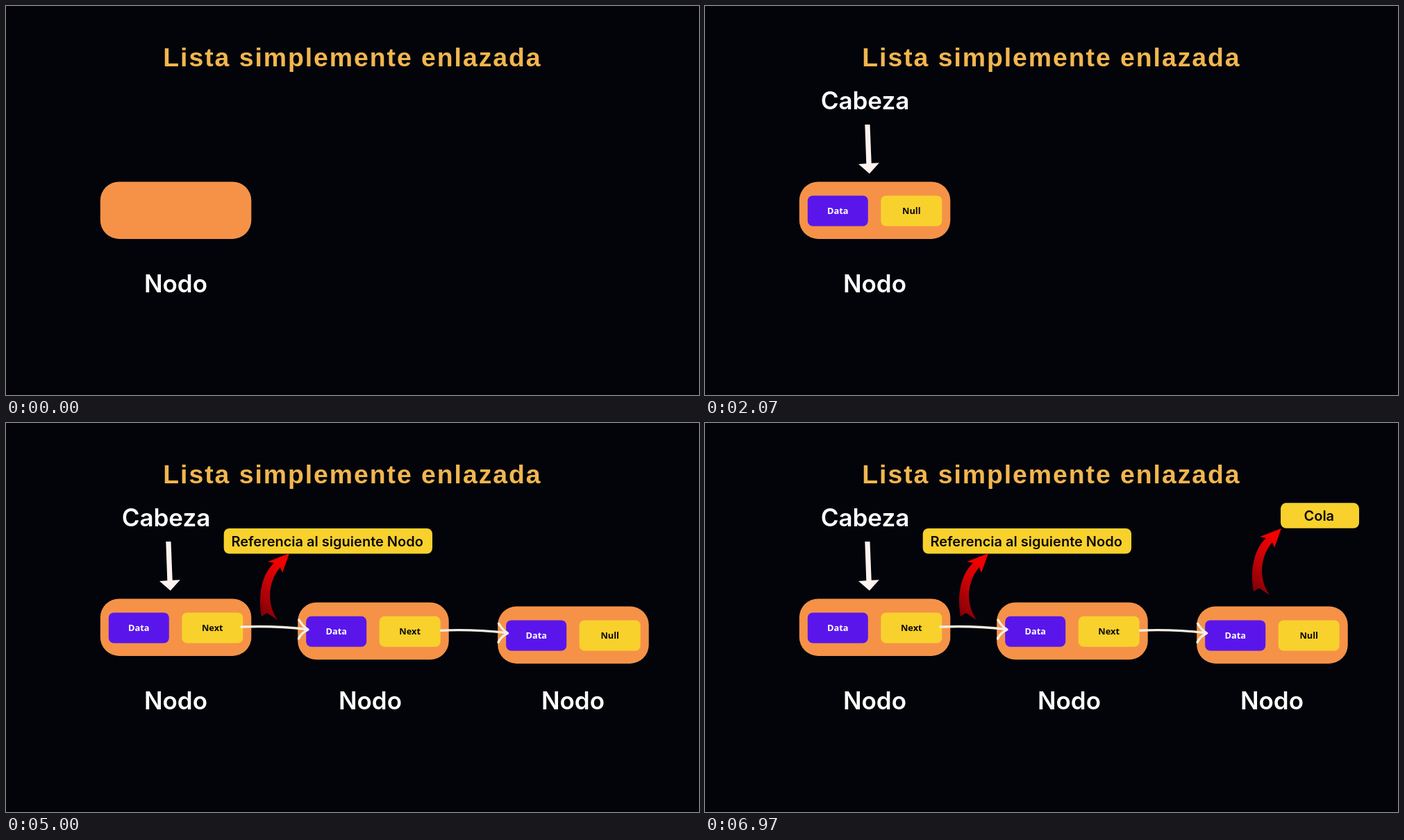
These frames come from a looping animation (998 by 561 pixels, 7.01 s). An HTML page:

```html
<!DOCTYPE html>
<html lang="es">
<head>
<meta charset="utf-8">
<title>Lista simplemente enlazada</title>
<style>
  html, body { margin: 0; height: 100%; overflow: hidden; background: #02040a; }
  svg { display: block; width: 100%; height: 100%; }
  text { text-anchor: middle; }
  .title { font: bold 37.4px "Liberation Sans", Arial, sans-serif; letter-spacing: 1.95px; fill: #f2b64f; text-anchor: start; }
  .big { font: 600 35px Inter, sans-serif; fill: #fff; }
  .note { font: 600 20px Inter, sans-serif; fill: #0b0a06; }
  .cell { font: bold 12.8px "Open Sans", sans-serif; fill: #0b0a06; }
  .data { fill: #fff; }
  .thin { font-weight: 400; font-size: 13.3px; }
  .yellow { fill: #f8d12d; }
  .link { fill: none; stroke: #f3eee2; stroke-width: 3.4; stroke-linecap: round; stroke-linejoin: round; }
</style>
</head>
<body>
<svg viewBox="0 0 998 561">
  <defs>
    <linearGradient id="red" x1="0.7" y1="0" x2="0.3" y2="1">
      <stop offset="0.1" stop-color="#f50000"/>
      <stop offset="0.55" stop-color="#c40308"/>
      <stop offset="1" stop-color="#850006"/>
    </linearGradient>
    <rect id="box" width="217.5" height="82.5" rx="27" fill="#f59248"/>
    <path id="ribbon" fill="url(#red)" d="M408 188 L377 200 L386 202 C370 216 362 246 368 279 L376 274 L391 284 C374 259 378 228 395 208 L398 216 Z"/>
    <g id="link" class="link">
      <path d="M339 294 Q386 292 434 297.5"/>
      <path d="M422 284 Q427 293 435 298 Q425 303 421.5 311"/>
    </g>
  </defs>
  <text class="title" x="226.3" y="87">Lista simplemente enlazada</text>
  <g id="scene"></g>
</svg>
<script>
const LOOP = 7010;
const scene = document.getElementById('scene');

// Each part is visible from `from` until `to` (ms).
function part(from, to, markup) {
  scene.insertAdjacentHTML('beforeend', `<g data-from="${from}" data-to="${to}">${markup}</g>`);
}

const data = (x, y, style = '') =>
  `<rect x="${x + 12}" y="${y + 20}" width="87" height="44" rx="7.5" fill="#5a16ea"/>
   <text class="cell data ${style}" x="${x + 55.5}" y="${y + 46.4}">Data</text>`;

const pointer = (x, y, label) =>
  `<rect class="yellow" x="${x + 117.5}" y="${y + 20}" width="88" height="44" rx="7.5"/>
   <text class="cell" x="${x + 161.5}" y="${y + 46.4}">${label}</text>`;

const box = (x, y, labelX) =>
  `<use href="#box" x="${x}" y="${y}"/><text class="big" x="${labelX}" y="412.5">Nodo</text>`;

const note = (x, y, w, label) =>
  `<rect class="yellow" x="${x}" y="${y}" width="${w}" height="36.5" rx="8"/>
   <text class="note" x="${x + w / 2 - 1.2}" y="${y + 26}">${label}</text>`;

const first = [135.8, 253.4], second = [420.2, 258.8], third = [708.2, 264.4];

part(0, LOOP, box(...first, 244.5));
part(1000, 2000, data(...first, 'thin'));
part(2000, LOOP, data(...first) +
  `<text class="big" x="230.5" y="149">Cabeza</text>
   <path fill="#fff3ef" d="M230.3 171 L237.5 171 L239.7 226.8 L250.8 226.3 L236.8 241.8 L221 228 L232.3 227.3 Z"/>`);
part(2000, 3000, pointer(...first, 'Null'));
part(3000, LOOP, pointer(...first, 'Next') + box(...second, 524.5) + data(...second));
part(3000, 5000, pointer(...second, 'Null'));
part(5000, LOOP, pointer(...second, 'Next') + box(...third, 816.5) + data(...third) +
  pointer(...third, 'Null') + '<use href="#link" x="287.5" y="5.2"/>');
part(3000, LOOP, '<use href="#link"/>');
part(4000, LOOP, note(313.7, 152, 300.3, 'Referencia al siguiente Nodo') + '<use href="#ribbon"/>');
part(6000, LOOP, note(829, 115.3, 113, 'Cola') + '<use href="#ribbon" x="422" y="-36"/>');

function draw() {
  const t = performance.now() % LOOP;
  for (const { dataset, style } of scene.children)
    style.display = t >= +dataset.from && t < +dataset.to ? '' : 'none';
  requestAnimationFrame(draw);
}
draw();
</script>
</body>
</html>
```
